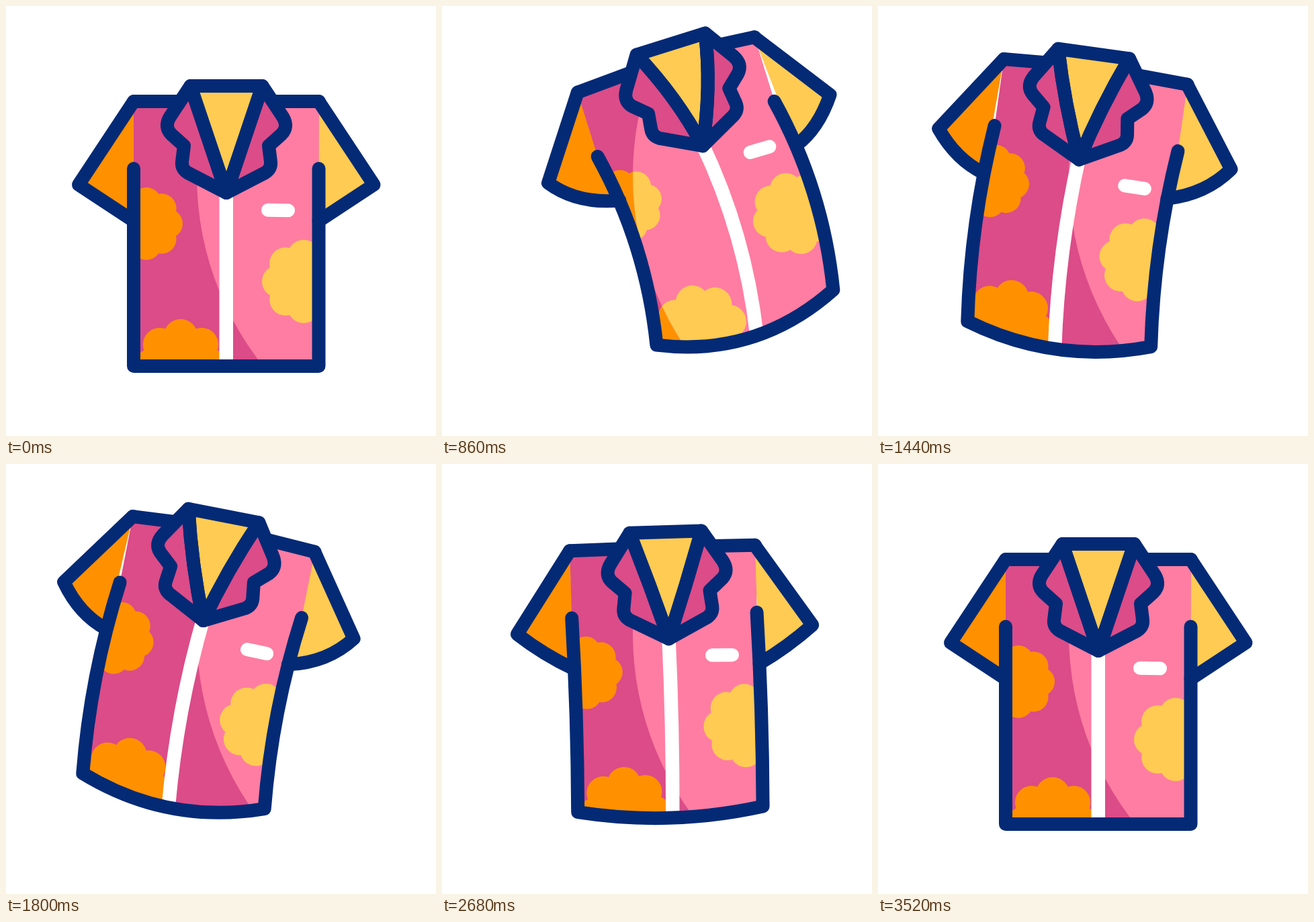
An HTML page with a canvas for the animation above (3600 ms loop, 640 by 640 pixels).

```html
<!DOCTYPE html>
<html lang="en">
<head>
<meta charset="utf-8">
<title>Swinging shirt</title>
<style>
  html, body { margin: 0; width: 100%; height: 100%; overflow: hidden; background: #fff; }
  canvas { display: block; width: 100vw; height: 100vh; }
</style>
</head>
<body>
<canvas id="stage" width="640" height="640"></canvas>
<script>
const ctx = document.getElementById('stage').getContext('2d');
const LOOP = 3600;
const NAVY = '#042a76', PINK = '#ff7da2', ROSE = '#db4c88', YELLOW = '#ffcb52', ORANGE = '#ff9000';

// Pose tracks share these key times (ms).
const TIMES = [100, 360, 760, 860, 1180, 1440, 1640, 2180, 2440, 2680, 2980, 3520];
const TRACKS = {
  x:       [328.5, 331, 334, 334, 328, 324.5, 324, 328, 329, 328.5, 328, 328.5],
  y:       [142, 121.3, 88, 87.3, 91, 98, 101, 114, 119, 125, 132, 142],
  angle:   [0, -7.6, -20.3, -17.4, -3, 7.85, 13, 0.4, -4.6, -1.8, 1.8, 0],
  bend:    [0, 4, 14, 15, 4, -8, -10, 0, 3, 2, -1, 0],
  hem:     [0, 8, 28, 31, 27, 23, 24, 29, 20, 13, 7, 0],
  lift:    [0, 0, 0, 0, 0, 0, 2, 9, 8, 5, 2, 0],
  flare:   [0, 2.5, 8, 8.5, 8, 8, 8.5, 8, 5, 2.5, 1, 0],
  collarX: [0, 3, 14, 16, 5, -6.5, -8, 6, 8, 5.5, 1, 0],
  collarY: [0, -0.6, -4, -4.4, -4, -3.2, -4, -3, -2, -0.7, 0, 0],
  pocket:  [0, 4, 16, 18.5, 10, 4, 3, 11.6, 10, 7, 3, 0],
  print:   [0, 0, 0, 0, -5, -10, -8, -3, 0, 0, 0, 0]
};

const slope = (v, i) => (v[i + 1] - v[i]) / (TIMES[i + 1] - TIMES[i]);

// Monotone tangent: flat at extremes and at both ends.
function tangent(v, i) {
  if (i === 0 || i === v.length - 1) return 0;
  const a = slope(v, i - 1), b = slope(v, i);
  return a * b <= 0 ? 0 : 2 * a * b / (a + b);
}

function sample(v, t) {
  const last = TIMES.length - 1;
  if (t <= TIMES[0]) return v[0];
  if (t >= TIMES[last]) return v[last];
  let i = 0;
  while (t >= TIMES[i + 1]) i++;
  const h = TIMES[i + 1] - TIMES[i], u = (t - TIMES[i]) / h, w = 1 - u;
  return v[i] * (1 + 2 * u) * w * w + v[i + 1] * u * u * (3 - 2 * u)
    + h * u * w * (tangent(v, i) * w - tangent(v, i + 1) * u);
}

function poseAt(t) {
  const pose = {};
  for (const key in TRACKS) pose[key] = sample(TRACKS[key], t);
  return pose;
}

function place(p) {
  ctx.translate(p.x, p.y);
  ctx.rotate(p.angle * Math.PI / 180);
  ctx.translate(-328.5, -142);
}

function sleeve(p, right) {
  const m = x => right ? 655.5 - x : x;
  const endX = m(190) + 0.78 * p.bend, endY = 320 - 0.7 * p.flare;
  const path = new Path2D();
  path.moveTo(m(190), 142);
  path.lineTo(m(108), 266 - p.flare);
  path.quadraticCurveTo(m(149 - 1.1 * p.flare), 293 + 0.9 * p.flare, endX, endY);
  return path;
}

// Side, bottom edge, side: open at the top.
function torsoEdge(p, path) {
  const bottom = 536 - p.lift, mid = (242 + bottom) / 2;
  path.quadraticCurveTo(190 + 2 * p.bend, mid, 190, bottom);
  path.quadraticCurveTo(327.75, bottom + 2 * p.hem, 465.5, bottom);
  path.quadraticCurveTo(465.5 + 2 * p.bend, mid, 465.5, 242);
}

function shoulders(p, path) {
  path.moveTo(466, 142);
  path.lineTo(401 + p.collarX, 142 + p.collarY);
  path.lineTo(255 + p.collarX, 142 + p.collarY);
  path.lineTo(190, 142);
}

function flower(path, x, y, ring, r) {
  const petals = new Path2D();
  petals.arc(x, y, ring, 0, 7);
  for (let i = 0; i < 8; i++) {
    const a = i * Math.PI / 4, px = x + ring * Math.cos(a), py = y + ring * Math.sin(a);
    petals.moveTo(px + r, py);
    petals.arc(px, py, r, 0, 7);
  }
  path.addPath(petals);
}

const flowers = new Path2D();
flower(flowers, 209, 324, 32, 22);
flower(flowers, 443, 410, 38, 24);
flower(flowers, 260, 535, 44, 25);

function lapel(p, right) {
  const m = x => right ? 656 - x : x;
  const path = new Path2D();
  path.moveTo(m(274.5), 119);
  path.lineTo(m(244), 165);
  path.quadraticCurveTo(m(235), 180, m(246), 191);
  path.lineTo(m(265), 208);
  path.lineTo(m(262), 232);
  path.quadraticCurveTo(m(261), 242, m(270), 248);
  path.lineTo(328, 278);
  path.quadraticCurveTo(m(301.25) + 0.8 * p.bend, 198.5, m(274.5), 119);
  path.closePath();
  return path;
}

function neck(p) {
  const path = new Path2D();
  path.moveTo(274.5, 119);
  path.lineTo(381.5, 119);
  path.quadraticCurveTo(354.75 + 0.8 * p.bend, 198.5, 328, 278);
  path.quadraticCurveTo(301.25 + 0.8 * p.bend, 198.5, 274.5, 119);
  path.closePath();
  return path;
}

function line(path, color = NAVY, width = 20) {
  ctx.strokeStyle = color;
  ctx.lineWidth = width;
  ctx.stroke(path);
}

function fill(path, color) {
  ctx.fillStyle = color;
  ctx.fill(path);
}

function cloth(p, parts, base, accent) {
  place(p);
  parts.sleeves.forEach(s => fill(s, accent));
  fill(parts.torso, base);
  ctx.clip(parts.torso);
  ctx.translate(p.print, 0);
  fill(flowers, accent);
}

function layer(draw) {
  ctx.save();
  draw();
  ctx.restore();
}

function draw(t) {
  const p = poseAt(t);
  const torso = new Path2D(), edge = new Path2D(), top = new Path2D(), zip = new Path2D();
  shoulders(p, torso);
  torso.lineTo(190, 242);
  torsoEdge(p, torso);
  torso.closePath();
  edge.moveTo(190, 242);
  torsoEdge(p, edge);
  shoulders(p, top);

  const zipX = 327.75 + 0.55 * p.collarX, zipY = 536 - p.lift + p.hem;
  const topX = 327.75 + p.collarX, topY = 272 + p.collarY;
  zip.moveTo(topX, topY);
  zip.quadraticCurveTo((topX + zipX) / 2 + 1.7 * p.bend, (topY + zipY) / 2, zipX, zipY);

  const parts = { torso, sleeves: [sleeve(p, false), sleeve(p, true)] };

  ctx.fillStyle = '#fff';
  ctx.fillRect(0, 0, 640, 640);
  ctx.lineCap = ctx.lineJoin = 'round';

  layer(() => cloth(p, parts, ROSE, ORANGE));
  // The lit area stays still while the shirt moves through it.
  layer(() => {
    ctx.beginPath();
    ctx.arc(739, 253, 455, 0, 7);
    ctx.clip();
    cloth(p, parts, PINK, YELLOW);
  });

  layer(() => {
    place(p);
    ctx.lineCap = 'butt';
    line(zip, '#fff', 20.5);
    ctx.lineCap = 'round';
    const pocket = new Path2D();
    pocket.moveTo(390 + p.pocket, 303.8);
    pocket.lineTo(420 + p.pocket, 304.3);
    line(pocket, '#fff');
    parts.sleeves.forEach(s => line(s));
    line(top);
    line(edge);

    ctx.translate(p.collarX, p.collarY);
    const flaps = [lapel(p, false), lapel(p, true)], inner = neck(p);
    fill(inner, YELLOW);
    flaps.forEach(f => fill(f, ROSE));
    line(inner);
    flaps.forEach(f => line(f));
  });
}

const start = performance.now();
function tick() {
  draw((performance.now() - start) % LOOP);
  requestAnimationFrame(tick);
}
tick();
</script>
</body>
</html>
```
